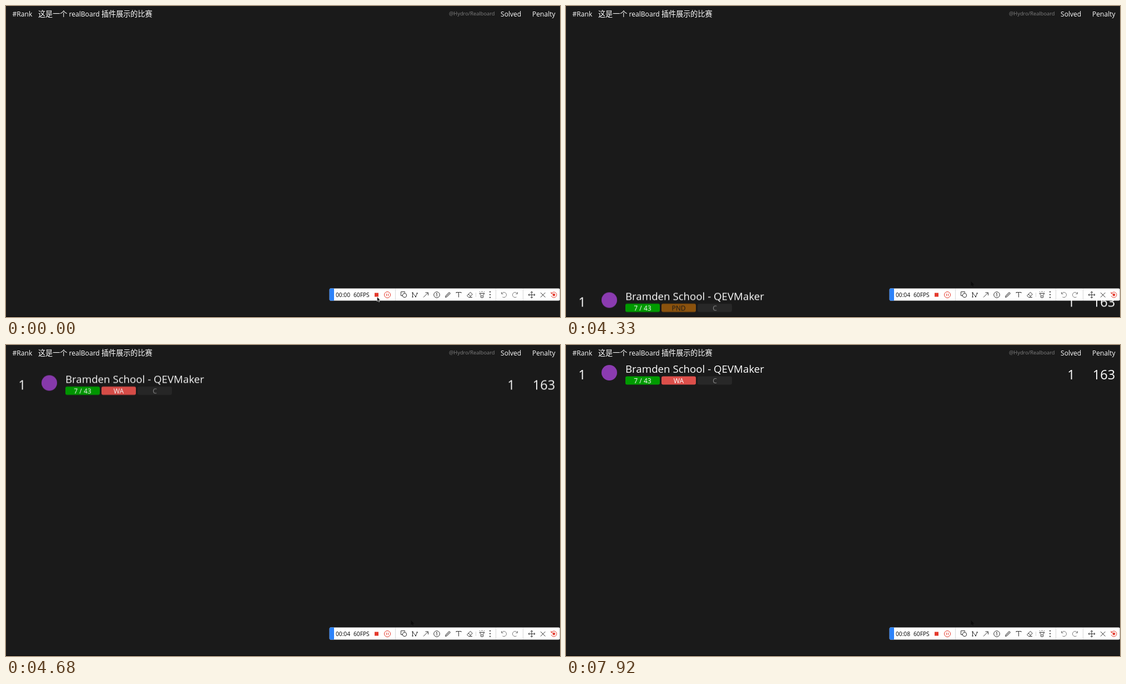
These frames come from a looping animation (998x561 px, 8000 ms). An HTML page:

```html
<!DOCTYPE html>
<html lang="zh-CN">
<head>
<meta charset="utf-8">
<title>Realboard</title>
<style>
  html, body { margin: 0; width: 100%; height: 100%; overflow: hidden; background: #1a1a1a; }
  svg { display: block; }
  text { font: 12.1px "Open Sans", "Noto Sans", sans-serif; fill: #fff; white-space: pre; }
  .cjk { font: 500 13.1px "Noto Sans CJK SC", "Noto Sans CJK", sans-serif; }
  .repo { font-size: 9.3px; fill: #808080; }
  .mid { text-anchor: middle; }
  .big { font-size: 23.7px; text-anchor: middle; }
  .team { font-size: 18.7px; }
  .bar text { font-size: 10.2px; fill: #000; }
  .icons { fill: none; stroke: #333; stroke-width: 1; }
  .red { fill: none; stroke: #e43a2d; }

  .row, .pending, .verdict, .digits, .cursor, .trace { animation: 8s linear infinite; }
  .row { animation-name: rise, fade; }
  .pending { animation-name: pending; }
  .verdict { animation-name: verdict; animation-timing-function: step-end; }
  .digits { animation-name: count; animation-timing-function: step-end; }
  .cursor { animation-name: leave; animation-timing-function: step-end; }
  .trace { animation-name: trace; animation-timing-function: step-end; }

  @keyframes rise {
    0% { transform: translateY(480.5px); }
    54.655% { transform: translateY(480.5px); animation-timing-function: cubic-bezier(.55, 0, .1, 1); }
    59.91%, 100% { transform: none; }
  }
  @keyframes fade {
    0%, 46.74% { opacity: 0; }
    46.75%, 54.645% { opacity: 1; }
    54.655% { opacity: .28; animation-timing-function: cubic-bezier(.55, 0, .1, 1); }
    59.91%, 100% { opacity: 1; }
  }
  @keyframes pending {
    0%, 52.6% { opacity: 1; }
    54.125% { opacity: .5; }
    54.5% { opacity: .38; }
    54.51%, 100% { opacity: 0; }
  }
  @keyframes verdict { 0% { opacity: 0; } 54.5%, 100% { opacity: 1; } }
  @keyframes count {
    0% { transform: none; }
    12.5% { transform: translateY(-20px); }
    25.125% { transform: translateY(-40px); }
    37.375% { transform: translateY(-60px); }
    49.875% { transform: translateY(-80px); }
    61.875% { transform: translateY(-100px); }
    73.875% { transform: translateY(-120px); }
    86.5% { transform: translateY(-140px); }
    99%, 100% { transform: translateY(-160px); }
  }
  @keyframes leave {
    0% { transform: translate(668px, 524px); opacity: 1; }
    .375% { transform: translate(729px, 496px); opacity: 1; }
    .75% { transform: translate(784px, 470px); opacity: 1; }
    1.125% { transform: translate(833px, 446px); opacity: 1; }
    1.5%, 100% { transform: translate(833px, 446px); opacity: 0; }
  }
  @keyframes trace { 0% { opacity: 0; } .375%, 100% { opacity: 1; } }
</style>
</head>
<body>
<svg width="998" height="561" viewBox="0 0 998 561">
  <defs>
    <clipPath id="slot"><rect x="613" y="514" width="9" height="14"/></clipPath>
    <path id="arrow" d="M.5 .5V9L2.4 7.3 3.7 10 5 9.4 3.8 6.8H6.3Z"/>
  </defs>

  <rect width="998" height="561" fill="#1a1a1a"/>
  <rect y="560" width="998" height="1" fill="#080808"/>

  <g class="header">
    <text x="11.5" y="18.5">#Rank</text>
    <text class="cjk" x="58" y="19">这是一个</text>
    <text x="113.5" y="18.5">realBoard</text>
    <text class="cjk" x="172" y="19">插件展示的比赛</text>
    <text class="repo" x="798" y="16.8">@Hydro/Realboard</text>
    <text x="891" y="18.5">Solved</text>
    <text x="948" y="18.5">Penalty</text>
  </g>

  <g class="row">
    <text class="big" x="29" y="62">1</text>
    <circle cx="78" cy="50" r="14" fill="#8b3bb0"/>
    <text class="team" x="107" y="50">Bramden School - QEVMaker</text>
    <rect x="107" y="56.5" width="62" height="15" rx="3" fill="#009a00"/>
    <text class="mid" x="138" y="68.5">7 / 43</text>
    <g class="pending">
      <rect x="172" y="56.5" width="62" height="15" rx="3" fill="#ff8c00"/>
      <text class="mid" x="203" y="68.5" style="fill:#1a1a1a">PND</text>
    </g>
    <g class="verdict">
      <rect x="172" y="56.5" width="62" height="15" rx="3" fill="#dc4f4a"/>
      <text class="mid" x="203" y="68.5">WA</text>
    </g>
    <rect x="237" y="56.5" width="62" height="15" rx="3" fill="#282828"/>
    <text class="mid" x="268" y="68.5" style="fill:#8a8a8a">C</text>
    <text class="big" x="910" y="62">1</text>
    <text class="big" x="969" y="62">163</text>
  </g>

  <g class="bar">
    <rect x="582.7" y="509.6" width="415" height="21.8" rx="2" fill="#fff"/>
    <path d="M591 509.6V531.4H584.7a2 2 0 0 1-2-2V511.6a2 2 0 0 1 2-2Z" fill="#2d83fb"/>
    <text x="594" y="524.8">00:0</text>
    <g clip-path="url(#slot)">
      <text class="digits"><tspan x="614.2" y="524.8">0</tspan><tspan x="614.2" dy="20">1</tspan><tspan x="614.2" dy="20">2</tspan><tspan x="614.2" dy="20">3</tspan><tspan x="614.2" dy="20">4</tspan><tspan x="614.2" dy="20">5</tspan><tspan x="614.2" dy="20">6</tspan><tspan x="614.2" dy="20">7</tspan><tspan x="614.2" dy="20">8</tspan></text>
    </g>
    <text x="626" y="524.8">60FPS</text>
    <rect x="664" y="517.5" width="7" height="7" fill="#e43a2d"/>
    <g class="red">
      <circle cx="687" cy="521" r="5.5"/>
      <path d="M685.5 518.8V523.2M688.5 518.8V523.2"/>
      <path d="M982.8 518.2A5 5 0 1 1 982.3 522.8M982 515.8V518.8H985"/>
      <circle cx="987" cy="521" r="2" fill="#e43a2d"/>
    </g>
    <path d="M701.5 510V531M882.5 510V531M931.5 510V531M846.5 517V525" stroke="#d8d8d8"/>

    <g class="icons">
      <path d="M714.5 522.5H711.5V515.5H718.5V517.5"/>
      <circle cx="718" cy="522" r="3.7"/>
      <path d="M732.5 517.5V525M732.5 517.5L738 524.5 740.5 518.5"/>
      <path d="M731.5 517.3h2M731.5 524.8h2M737 524.3h2M739.6 518.3h2" stroke-width="1.9"/>
      <path d="M752 525.5L760.5 517M755.5 517H760.5V522"/>
      <circle cx="776" cy="521" r="5.3"/>
      <path d="M774.5 519.2L776.2 518V524"/>
      <path d="M791.5 525.5L792.2 522.5 798.3 516.2 800.6 518.5 794.3 524.8ZM793 523.8L799.4 517.4"/>
      <path d="M811 518V516.5H820V518M815.5 516.5V525.5"/>
      <path d="M830.5 522.5L836.5 516.3 840.3 520 835 525.5H833.3ZM833 520L837.3 524M835 525.5H840"/>
      <path d="M853 518.5H862L859.5 521.5V526H855.5V521.5ZM857.5 521.5V523.5M857.5 516.5V514.5M854.5 516.7L853.3 515.3M860.5 516.7L861.7 515.3"/>
      <path d="M872 515.7h.01M872 520.7h.01M872 525.7h.01" stroke-width="2.2" stroke-linecap="round"/>
      <g stroke="#777">
        <path id="undo" d="M892.5 516V519.3H895.8M892.8 519A4.6 4.6 0 1 1 894.5 525"/>
        <use href="#undo" transform="matrix(-1 0 0 1 1814 0)"/>
      </g>
      <path d="M941 521H953M947 515V527M943 519L941 521 943 523M951 519L953 521 951 523M945 517L947 515 949 517M945 525L947 527 949 525"/>
      <path d="M963 517L971.5 525.5M971.5 517L963 525.5"/>
    </g>
  </g>

  <g class="trace"><use href="#arrow" x="729" y="496" fill="#0b0b0b"/></g>
  <g class="cursor"><use href="#arrow" fill="#111" stroke="#fff" stroke-width=".6"/></g>
</svg>
</body>
</html>
```
